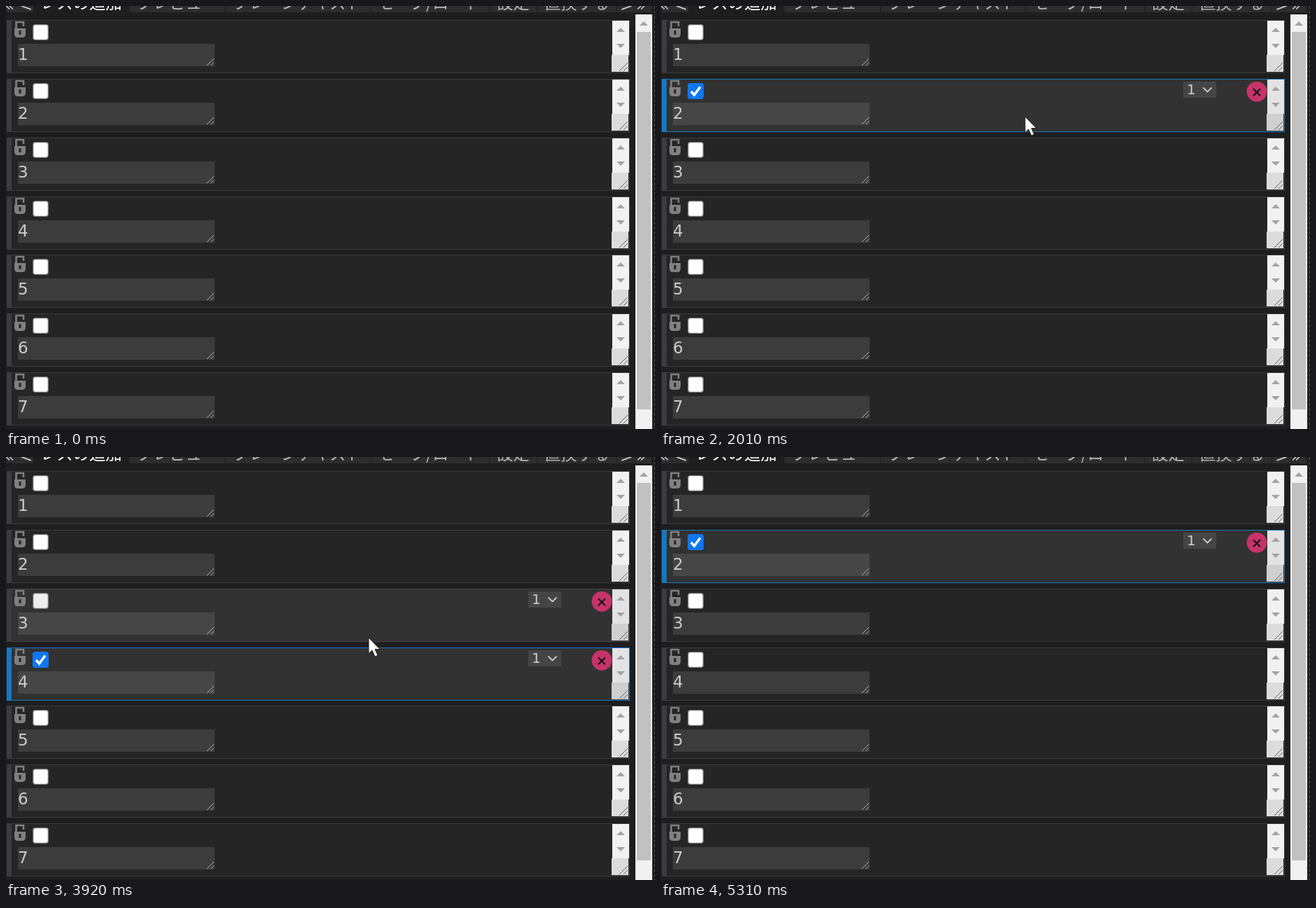
Write an HTML page that moves like this. It is 927 px wide and 604 px high and loops after 5.88 s.

```html
<!DOCTYPE html>
<html lang="ja">
<head>
<meta charset="utf-8">
<style>
html, body { margin: 0; width: 100%; height: 100%; overflow: hidden; background: #1e1e1e; }
svg { display: block; }
text { font-family: "DejaVu Sans", sans-serif; font-size: 23px; fill: #ccc; }
.tab { font-family: "Noto Sans CJK JP", "Noto Sans CJK", sans-serif; font-size: 23.3px; fill: #b8b8b8; }
.tab.current { fill: #fff; }
.grip { fill: none; stroke: #b4b4b4; }
.corner-grip { fill: none; stroke: #606060; }
.frame, .bar, .field { fill: #3c3c3c; }
.inner { fill: #252526; }
.box { fill: #fff; stroke: #767676; stroke-width: 1.3; }
.track { fill: #f1f1f1; }
.corner { fill: #dcdcdc; }
.arrow { fill: #a3a3a3; }
.tools, .tick { visibility: hidden; }
.active .tools, .selected .tick { visibility: visible; }
.active .inner { fill: #323232; }
.active .frame, .active .field { fill: #464646; }
.active .box { fill: #eee; }
.active .track { fill: #e3e3e3; }
.active .corner { fill: #cfcfcf; }
.selected .frame, .selected .bar { fill: #1579c0; }
.selected .box { fill: #0f78f0; stroke: #0f78f0; }
</style>
</head>
<body>
<svg id="stage" width="927" height="604" viewBox="0 0 927 604"></svg>
<script>
const LOOP = 5880, ROW_COUNT = 7, ROW_HEIGHT = 76, ROW_PITCH = 83.75, FIRST_ROW = 20.3;
const stage = document.getElementById('stage');
const rowTop = i => Math.round(FIRST_ROW + ROW_PITCH * i);
const rect = (x, y, w, h, attrs) => `<rect x="${x}" y="${y}" width="${w}" height="${h}" ${attrs}/>`;

function tabBar() {
  const size = 23.3, pad = 10;
  const labels = ['レスの追加', 'プレビュー', 'プレーンテキスト', 'セーブ/ロード', '設定', '置換する'];
  const labelWidth = label => [...label].reduce((w, c) => w + size * (c === '/' ? 0.39 : 1), 0);
  let x = 39, html = rect(0, 0, 922, 9, 'fill="#2d2d2d"');
  labels.forEach((label, i) => {
    const width = labelWidth(label) + 2 * pad;
    html += rect(x, 0, width, 9, `fill="${i ? '#2d2d2d' : '#1e1e1e'}"`) +
      rect(x + width, 0, 1, 9, 'fill="#1e1e1e"') +
      `<text class="tab ${i ? '' : 'current'}" x="${x + pad}" y="4">${label}</text>`;
    x += width + 1;
  });
  const scroller = (left, sign) => `<text x="${left}" y="7">${sign}</text>`;
  return html + scroller(-2, '«') + scroller(19, '&lt;') + scroller(877, '&gt;') + scroller(900, '»');
}

function row(i) {
  return `<g class="row" transform="translate(0 ${rowTop(i)})">
    ${rect(1, 0, 890, ROW_HEIGHT, 'class="frame"')}
    ${rect(8, 1, 882, ROW_HEIGHT - 2, 'class="inner"')}
    ${rect(1, 0, 7, ROW_HEIGHT, 'class="bar"')}
    <path d="M14.5 13V3H25V9" fill="none" stroke="#808080" stroke-width="2.6"/>
    <path d="M12 12H28V20Q28 25 23 25H17Q12 25 12 20Z" fill="#808080"/>
    <path d="M20 15V21" stroke="#252526" stroke-width="3"/>
    ${rect(38.7, 6.7, 21.6, 21.6, 'rx="3" class="box"')}
    <path class="tick" d="M43 18L47.5 23L56 11.5" fill="none" stroke="#fff" stroke-width="3.4"/>
    ${rect(17, 34, 281, 32, 'class="field"')}
    <text x="17" y="57">${i + 1}</text>
    <path class="grip" d="M287 65L297 55M292.5 65L297 60.5"/>
    <g class="tools">
      ${rect(746, 4, 47, 23, 'fill="#454545"')}
      <text x="751" y="22" style="font-size:20px">1</text>
      <path d="M774.5 12.5L780.5 18.5L786.5 12.5" fill="none" stroke="#ccc" stroke-width="1.8"/>
      <circle cx="851" cy="18.3" r="14.4" fill="#c7336b"/>
      <path d="M846 14.3L856 24.3M856 14.3L846 24.3" stroke="#111" stroke-width="2"/>
    </g>
    ${rect(866, 1, 24, 49, 'class="track"')}
    ${rect(865, 50, 24, 24, 'class="corner"')}
    <path class="arrow" d="M872 17L878 11L884 17ZM872 34L878 40L884 34Z"/>
    <path class="corner-grip" d="M876 73L888 61M882 73L888 67"/>
  </g>`;
}

stage.innerHTML = rect(0, 0, 927, 604, 'fill="#1e1e1e"') + tabBar() +
  Array.from({ length: ROW_COUNT }, (_, i) => row(i)).join('') +
  rect(899, 12, 24, 592, 'fill="#f1f1f1"') + rect(901, 37, 20, 539, 'fill="#c1c1c1"') +
  `<path class="arrow" d="M905 28L911 22L917 28Z"/>
  <path d="M926.5 0V604" stroke="#555" stroke-dasharray="4 3"/>
  <path id="pointer" d="M0 0V22.5L5 18L9 27L13 25.2L9 16.5H16Z" fill="#fff" stroke="#222"/>`;

const rows = [...stage.querySelectorAll('.row')];
const pointer = document.getElementById('pointer');

// Pointer stops; a click toggles the row under the tip.
const stops = [
  { at: 0, x: 620, y: -40 },
  { at: 670, x: 564, y: 147 },
  { at: 950, x: 560, y: 150, click: true },
  { at: 1500, x: 530, y: 560 },
  { at: 2010, x: 520, y: 158 },
  { at: 2330, x: 520, y: 150, click: true },
  { at: 2700, x: 522, y: 310, click: true },
  { at: 3150, x: 524, y: 390 },
  { at: 3350, x: 522, y: 460 },
  { at: 3920, x: 518, y: 258 },
  { at: 4100, x: 518, y: 300, click: true },
  { at: 4790, x: 520, y: 179 },
  { at: 5000, x: 520, y: 150, click: true },
  { at: 5290, x: 530, y: -40 }
];

const ease = u => u * u * (3 - 2 * u);
const rowAt = y => rows.findIndex((_, i) => y >= rowTop(i) && y < rowTop(i) + ROW_HEIGHT);

function pointerAt(t) {
  const k = stops.findIndex(s => s.at > t);
  if (k < 0) return stops[stops.length - 1];
  const a = stops[k - 1], b = stops[k];
  const u = ease((t - a.at) / (b.at - a.at));
  return { x: a.x + (b.x - a.x) * u, y: a.y + (b.y - a.y) * u };
}

function selectedAt(t) {
  return stops.filter(s => s.click && s.at <= t).reduce((selected, s) => {
    const hit = rowAt(s.y);
    return hit === selected ? -1 : hit;
  }, -1);
}

function draw(t) {
  const { x, y } = pointerAt(t);
  const hovered = rowAt(y), selected = selectedAt(t);
  pointer.setAttribute('transform', `translate(${Math.round(x)} ${Math.round(y)})`);
  rows.forEach((el, i) => {
    el.classList.toggle('selected', i === selected);
    el.classList.toggle('active', i === hovered || i === selected);
  });
}

const start = performance.now();
function tick() {
  draw((performance.now() - start) % LOOP);
  requestAnimationFrame(tick);
}
tick();
</script>
</body>
</html>
```
